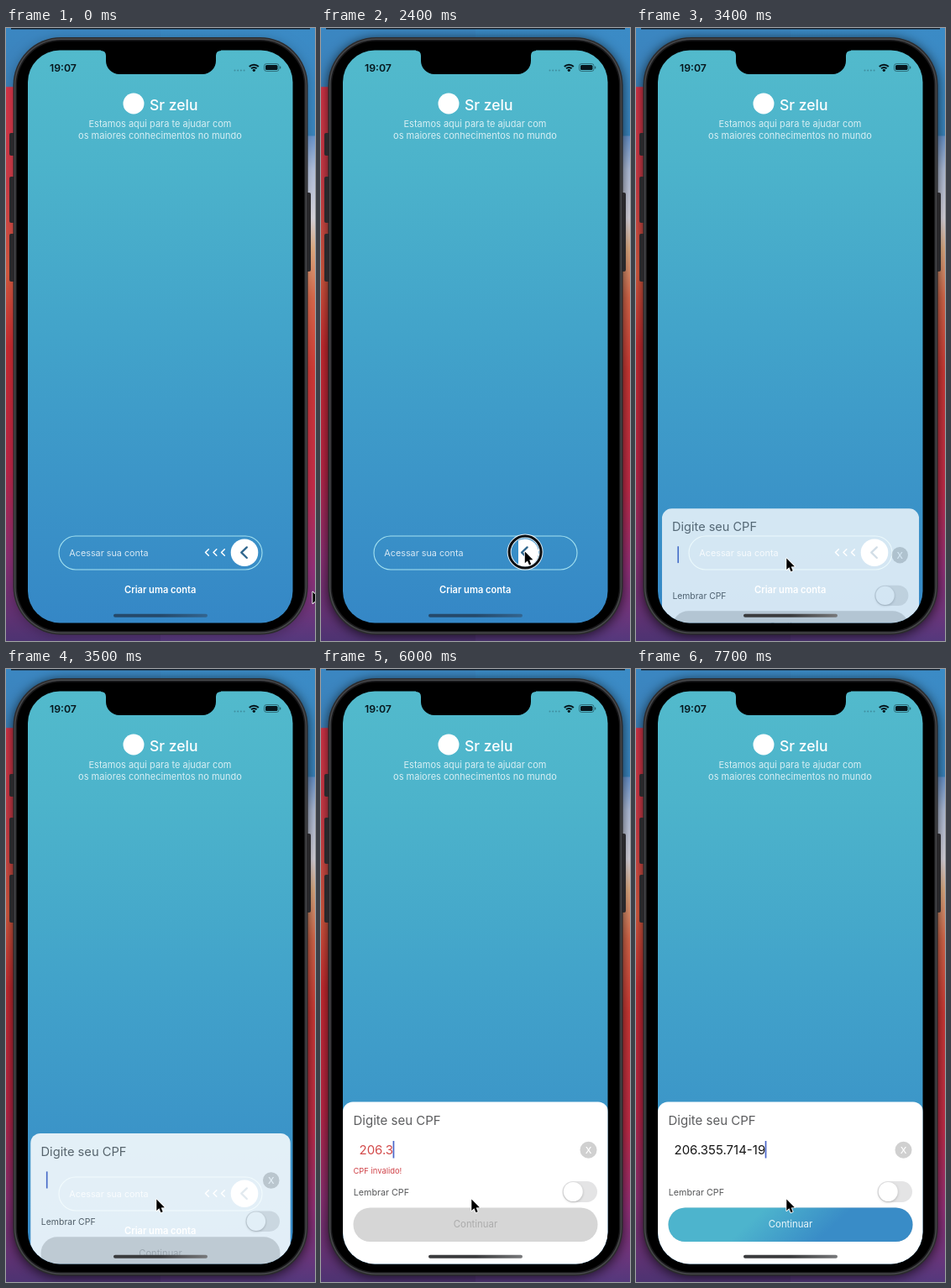
These frames come from a looping animation (368x730 px, 8000 ms). An HTML page with a canvas:

```html
<!DOCTYPE html>
<html lang="pt">
<head>
<meta charset="utf-8">
<title>Acesso</title>
<style>
  html, body { margin: 0; width: 100%; height: 100%; overflow: hidden; background: #000; }
  canvas { display: block; width: 368px; height: 730px; }
</style>
</head>
<body>
<canvas id="stage"></canvas>
<script>
const W = 368, H = 730, LOOP = 8000, STEP = 100;
const FONT = 'Inter, "Noto Sans", sans-serif';
const CPF = '206.355.714-19';
// [time, characters shown]
const KEYS = [[4700, 1], [5100, 2], [5400, 3], [6000, 5], [6400, 6], [6600, 7],
  [6800, 9], [6900, 10], [7200, 11], [7300, 13], [7500, 14]];
// [time, x, y] of the pointer tip
const PATH = [[0, 365.3, 671.5], [700, 312, 640], [1000, 312, 640], [1900, 284, 618.5],
  [2100, 284, 618.5], [2800, 179.3, 631.5], [LOOP, 179.3, 631.5]];
const PRESS = 2000, RELEASE = 3000, OPEN = 3100, SETTLED = 4300, VALID = 7500;
const SCREEN = { x: 26, y: 26.5, w: 315.5, h: 682, r: 38 };

const dpr = window.devicePixelRatio || 1;

function sized(canvas) {
  canvas.width = W * dpr;
  canvas.height = H * dpr;
  return canvas.getContext('2d');
}

const stage = sized(document.getElementById('stage'));
const layer = sized(document.createElement('canvas'));
let c = stage;

const clamp = v => Math.min(1, Math.max(0, v));
const smooth = v => v * v * (3 - 2 * v);

function gradient(x0, y0, x1, y1, stops) {
  const g = c.createLinearGradient(x0, y0, x1, y1);
  for (const [at, color] of stops) g.addColorStop(at, color);
  return g;
}

function box(x, y, w, h, r, fill) {
  c.beginPath();
  c.roundRect(x, y, w, h, r);
  if (fill) { c.fillStyle = fill; c.fill(); }
}

function disc(x, y, r, fill) {
  c.beginPath();
  c.arc(x, y, r, 0, Math.PI * 2);
  c.fillStyle = fill;
  c.fill();
}

function shadow(color, blur, dy) {
  c.shadowColor = color;
  c.shadowBlur = blur * dpr;
  c.shadowOffsetY = dy * dpr;
}

function text(s, x, y, size, color, weight = 400, align = 'left') {
  c.font = `${weight} ${size}px ${FONT}`;
  c.textAlign = align;
  c.fillStyle = color;
  c.fillText(s, x, y);
}

function chevron(x, y, w, h, color, width) {
  c.beginPath();
  c.moveTo(x + w, y - h);
  c.lineTo(x, y);
  c.lineTo(x + w, y + h);
  c.strokeStyle = color;
  c.lineWidth = width;
  c.lineCap = c.lineJoin = 'round';
  c.stroke();
}

function pointerAt(t) {
  const i = PATH.findIndex(p => p[0] > t);
  const [t0, x0, y0] = PATH[i - 1], [t1, x1, y1] = PATH[i];
  const k = smooth((t - t0) / (t1 - t0));
  return { x: x0 + (x1 - x0) * k, y: y0 + (y1 - y0) * k };
}

function wallpaper() {
  c.fillStyle = gradient(0, 0, 0, H, [[0, '#3b87c2'], [.095, '#3b80b8'], [.097, '#d63448'],
    [.25, '#d13c48'], [.4, '#d65a40'], [.52, '#cb2a30'], [.72, '#bd2546'],
    [.86, '#8c2e72'], [1, '#4d3372']]);
  c.fillRect(0, 0, W / 2, H);
  c.fillStyle = gradient(0, 0, 0, H, [[0, '#3b8bc6'], [.175, '#3a86c0'], [.177, '#6c97d0'],
    [.23, '#b4c3e0'], [.31, '#dcd9e2'], [.36, '#e2ae84'], [.44, '#dc6a4c'],
    [.56, '#d33a36'], [.75, '#c62c4a'], [.88, '#96307a'], [1, '#54387c']]);
  c.fillRect(W / 2, 0, W / 2, H);
  c.fillStyle = '#17202b';
  c.fillRect(6, 0, 356, 1.5);
}

// The window shadow grows once the pointer makes the window active.
function phoneBody(t) {
  c.save();
  shadow(`rgba(0,0,0,${t < 1100 ? .25 : .7})`, 14, 2);
  box(8.5, 11, 351, 711.5, 57, '#2b2b2d');
  c.restore();
  for (const [x, y, h] of [[4, 125, 27], [4, 177, 55], [4, 245, 57], [356, 196, 94]])
    box(x, y, 7, h, 2, '#29282b');
  box(10, 12.5, 348, 708.5, 55.5, '#47484b');
  box(11.5, 14, 345, 705.5, 54, '#1a1a1c');
  box(13, 15.5, 342, 702.5, 52.5, '#000');
}

function notch() {
  const l = 119, r = 250, top = 26, bottom = 55, q = 16;
  c.beginPath();
  c.moveTo(l - 6, top);
  c.lineTo(l - 6, top + 1);
  c.quadraticCurveTo(l, top + 1, l, top + 7);
  c.arcTo(l, bottom, l + q, bottom, q);
  c.arcTo(r, bottom, r, top + 7, q);
  c.lineTo(r, top + 7);
  c.quadraticCurveTo(r, top + 1, r + 6, top + 1);
  c.lineTo(r + 6, top);
  c.fillStyle = '#000';
  c.fill();
}

function statusBar() {
  text('19:07', 52, 51.5, 12.3, '#06161c', 600);
  for (let i = 0; i < 4; i++) disc(272.5 + i * 3.7, 50.5, 1, '#3f8d9e');
  c.strokeStyle = '#06161c';
  c.lineCap = 'butt';
  c.lineWidth = 2;
  for (const r of [4.6, 7.8]) {
    c.beginPath();
    c.arc(295.3, 51.5, r, -Math.PI * .75, -Math.PI * .25);
    c.stroke();
  }
  disc(295.3, 50.3, 1.6, '#06161c');
  box(307.5, 42.5, 17.5, 9, 2.8);
  c.strokeStyle = 'rgba(6,22,28,.45)';
  c.lineWidth = 1;
  c.stroke();
  box(309, 44, 14.5, 6, 1.6, '#06161c');
  box(326, 45.5, 1.3, 3, .6, 'rgba(6,22,28,.5)');
}

function header() {
  disc(152, 90, 12.5, '#fff');
  text('Sr zelu', 171, 98, 17.5, '#fff', 500);
  const pale = 'rgba(255,255,255,.78)';
  text('Estamos aqui para te ajudar com', 183.5, 118, 11, pale, 400, 'center');
  text('os maiores conhecimentos no mundo', 183.5, 131.5, 11, pale, 400, 'center');
}

function knobShift(t, pointer) {
  if (t < PRESS) return 0;
  if (t < RELEASE) return Math.max(-56, pointer.x - 284);
  return -56 * (1 - smooth(clamp((t - RELEASE + 100) / 400)));
}

function slider(t, pointer) {
  box(63, 605, 242, 40, 20);
  c.strokeStyle = '#a5e3f1';
  c.lineWidth = 1.1;
  c.stroke();
  text('Acessar sua conta', 75.3, 628.5, 10.8, 'rgba(255,255,255,.8)');
  for (const x of [237.5, 247, 256.5]) chevron(x, 624.5, 3.8, 3.8, '#fff', 1.5);
  const x = 284 + knobShift(t, pointer);
  c.save();
  c.beginPath();
  c.rect(235, 604, 71, 42);
  c.clip();
  disc(x, 624.7, 16.3, '#fff');
  chevron(x - 3.7, 624.7, 6.5, 6.3, '#32688f', 2.4);
  c.restore();
  text('Criar uma conta', 183.7, 672.5, 11.1, '#fff', 600, 'center');
}

function cpfField(t) {
  let count = 0;
  for (const [at, n] of KEYS) if (t >= at) count = n;
  const valid = t >= VALID, typed = CPF.slice(0, count);
  text(typed, 45.5, 578.3, 15, valid ? '#161616' : '#d34b4b');
  const end = c.measureText(typed).width;
  c.fillStyle = '#4a66c9';
  c.fillRect(45 + end, 562, 1.7, 20.5);
  if (count && !valid) text('CPF invalido!', 38.5, 600.5, 9.4, '#d0444a');
  disc(318.5, 572.8, 10, '#d0d0d0');
  text('X', 318.5, 576.8, 11, '#fff', 500, 'center');
}

function toggle() {
  box(287.5, 610, 41.5, 25, 12.5, '#e4e4e5');
  c.save();
  shadow('rgba(0,0,0,.22)', 3, 1);
  disc(300.3, 622.5, 11.5, '#fff');
  c.restore();
}

function button(t) {
  const on = clamp((t - VALID + 100) / 300);
  box(38.5, 641.5, 291, 40.5, 20, '#d6d6d6');
  text('Continuar', 184, 665.3, 11.4, '#acacac', 400, 'center');
  if (!on) return;
  c.globalAlpha = on;
  box(38.5, 641.5, 291, 40.5, 20,
    gradient(160, 636, 208, 688, [[0, '#4db4cd'], [1, '#398cc7']]));
  text('Continuar', 184, 665.3, 11.4, '#e8f6fa', 400, 'center');
  c.globalAlpha = 1;
}

// Painted on its own layer, so that it fades in as one piece.
function sheet(t) {
  if (t < OPEN) return;
  const rest = t >= SETTLED ? 0 : Math.exp(-(t - OPEN) / 240);
  const scale = 1 - .11 * rest;
  c = layer;
  c.setTransform(dpr, 0, 0, dpr, 0, 0);
  c.clearRect(0, 0, W, H);
  c.translate(184, 515.5 + 198 * rest);
  c.scale(scale, scale);
  c.translate(-184, -515.5);
  box(26, 515.5, 316, 260, 12, '#fff');
  text('Digite seu CPF', 38.5, 543, 15, '#5c5d5f');
  cpfField(t);
  text('Lembrar CPF', 38.8, 626.5, 10.7, '#565759');
  toggle();
  button(t);
  c = stage;
  c.globalAlpha = 1 - .75 * rest;
  c.drawImage(layer.canvas, 0, 0, W, H);
  c.globalAlpha = 1;
}

function homeBar(t) {
  const [from, to] = t < OPEN ? ['#25496a', '#33658f'] : ['#3a3b3d', '#78797b'];
  box(128, 697.8, 112, 4, 2, gradient(128, 0, 240, 0, [[0, from], [.5, from], [1, to]]));
}

function pointerMark(t, { x, y }) {
  if (t >= PRESS && t < RELEASE) {
    c.beginPath();
    c.arc(x + .3, y + .5, 19, 0, Math.PI * 2);
    c.strokeStyle = 'rgba(255,255,255,.85)';
    c.lineWidth = 5;
    c.stroke();
    c.strokeStyle = '#0a0d10';
    c.lineWidth = 3;
    c.stroke();
  }
  c.save();
  c.translate(x, y);
  c.beginPath();
  for (const [px, py] of [[0, 0], [0, 13.6], [3.1, 10.8], [5.2, 15.8], [7.4, 14.8], [5.4, 9.9], [9.6, 9.7]])
    c.lineTo(px, py);
  c.closePath();
  c.lineJoin = 'round';
  c.strokeStyle = '#fff';
  c.lineWidth = 1.7;
  c.stroke();
  c.fillStyle = '#000';
  c.fill();
  c.restore();
}

function draw(t) {
  const pointer = pointerAt(t);
  c.setTransform(dpr, 0, 0, dpr, 0, 0);
  wallpaper();
  phoneBody(t);
  c.save();
  box(SCREEN.x, SCREEN.y, SCREEN.w, SCREEN.h, SCREEN.r);
  c.clip();
  c.fillStyle = gradient(0, 27, 0, 709, [[0, '#52bacc'], [.2, '#4cb3cb'], [.5, '#42a3ca'], [1, '#3587c6']]);
  c.fillRect(26, 26, 317, 684);
  statusBar();
  header();
  slider(t, pointer);
  sheet(t);
  homeBar(t);
  c.restore();
  notch();
  pointerMark(t, pointer);
}

const start = performance.now();
function frame() {
  const t = (performance.now() - start) % LOOP;
  draw(Math.floor(t / STEP) * STEP);
  requestAnimationFrame(frame);
}
frame();
</script>
</body>
</html>
```
